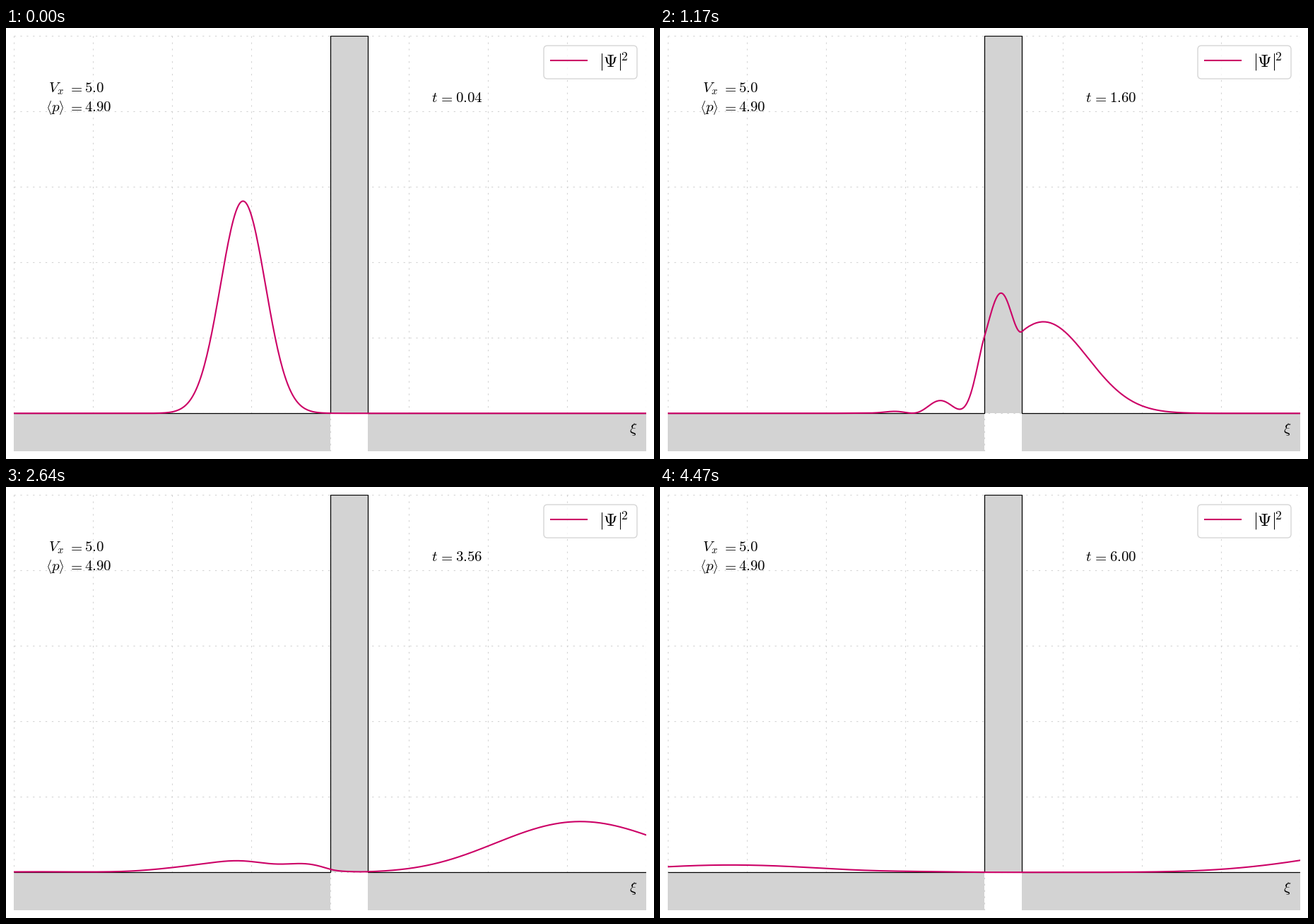
A matplotlib script that plays this animation: 917x611 px, repeating every 5.4 s.

```python
import numpy as np
import matplotlib.pyplot as plt
from matplotlib.animation import FuncAnimation
from matplotlib.patches import FancyBboxPatch, Rectangle

plt.rcParams["mathtext.fontset"] = "cm"

W, H, DPI = 917, 611, 100
STEPS, HOLD = 150, 30          # moving frames, then still frames
DT, SUB = 0.04, 20             # time per frame, solver steps per frame
X0, P0 = -3.0, 3.05            # start and momentum of the packet
V0, WIDTH = 2.0, 1.2           # barrier height and width
GREY, PINK = "#d3d3d3", "#cc0066"


def evolve():
    """Densities of a Gaussian packet crossing the barrier (split-step FFT)."""
    n, dx = 2000, 0.04
    x = (np.arange(n) + 0.5 - n / 2) * dx
    k = 2 * np.pi * np.fft.fftfreq(n, dx)
    dt = DT / SUB
    psi = np.pi ** -0.25 * np.exp(-(x - X0) ** 2 / 2 + 1j * P0 * x)
    barrier = np.where((x > 0) & (x < WIDTH), V0, 0)
    half = np.exp(-0.5j * barrier * dt)
    drift = np.exp(-0.5j * k ** 2 * dt)
    shown = np.abs(x) < 10.1
    rows = []
    for _ in range(STEPS + 1):
        for _ in range(SUB):
            psi = half * np.fft.ifft(drift * np.fft.fft(half * psi))
        rows.append(np.abs(psi[shown]) ** 2)
    return x[shown], rows[1:]


x, density = evolve()

fig = plt.figure(figsize=(W / DPI, H / DPI), dpi=DPI, facecolor="white")
left, right, top, bottom = 11.4, 905.9, 11.25, 599.75
ax = fig.add_axes([left / W, 1 - bottom / H, (right - left) / W, (bottom - top) / H])
ax.set_xlim(-10, 10)
ax.set_ylim(-0.1, 1)
ax.axis("off")

# Potential
for x_a, y_a, w, h in [(-10, -0.1, 10, 0.1), (WIDTH, -0.1, 10 - WIDTH, 0.1), (0, 0, WIDTH, 1)]:
    ax.add_patch(Rectangle((x_a, y_a), w, h, fc=GREY, lw=0, zorder=1))
ax.plot([-10, 0, 0, WIDTH, WIDTH, 10], [0, 0, 1, 1, 0, 0], color="black", lw=0.9,
        solid_joinstyle="miter", solid_capstyle="butt", zorder=2)

# Grid
dots = dict(color=GREY, lw=0.8, ls=(0, (2, 6)), zorder=1.5)
for gx in np.linspace(-10, 10, 9):
    ax.plot([gx, gx], [-0.1, 1], **dots)
for gy in np.linspace(0, 1, 6):
    ax.plot([-10, 10], [gy, gy], **dots)

curve, = ax.plot([], [], color=PINK, lw=1.5, zorder=3)

# Overlay in pixels, y downwards
over = fig.add_axes([0, 0, 1, 1])
over.set_xlim(0, W)
over.set_ylim(H, 0)
over.axis("off")


def label(px, py, text, size=15, ha="left"):
    return over.text(px, py, f"${text}$", size=size, ha=ha, va="baseline", color="black")


label(81.5, 91, "V_x", ha="right")
# h and i of the calligraphic face are the text-size angle brackets
label(82, 118, r"\mathcal{h}p\mathcal{i}", ha="right")
label(87.5, 91, "=")
label(87.5, 118, "=")
label(111, 91, "5.0")
label(111, 118, "4.90")
label(602, 105, "t")
label(611.5, 105, "=")
clock = label(636, 105, "0.04")
label(882, 574, r"\xi")

over.add_patch(FancyBboxPatch((761, 25), 132, 47, boxstyle="round,pad=0,rounding_size=5.3",
                              fc="white", ec="#cccccc", lw=1, alpha=0.8))
over.plot([769.5, 822.5], [46, 46], color=PINK, lw=1.5, solid_capstyle="butt")
label(839, 54.5, r"|\Psi|", size=18)
label(870.5, 46, "2", size=12.6)


def update(i):
    n = min(i, STEPS - 1)
    curve.set_data(x, density[n])
    clock.set_text(f"${DT * (n + 1):.2f}$")
    return curve, clock


anim = FuncAnimation(fig, update, frames=STEPS + HOLD, interval=30,
                     repeat=True, repeat_delay=0, blit=False)
plt.show()
```
